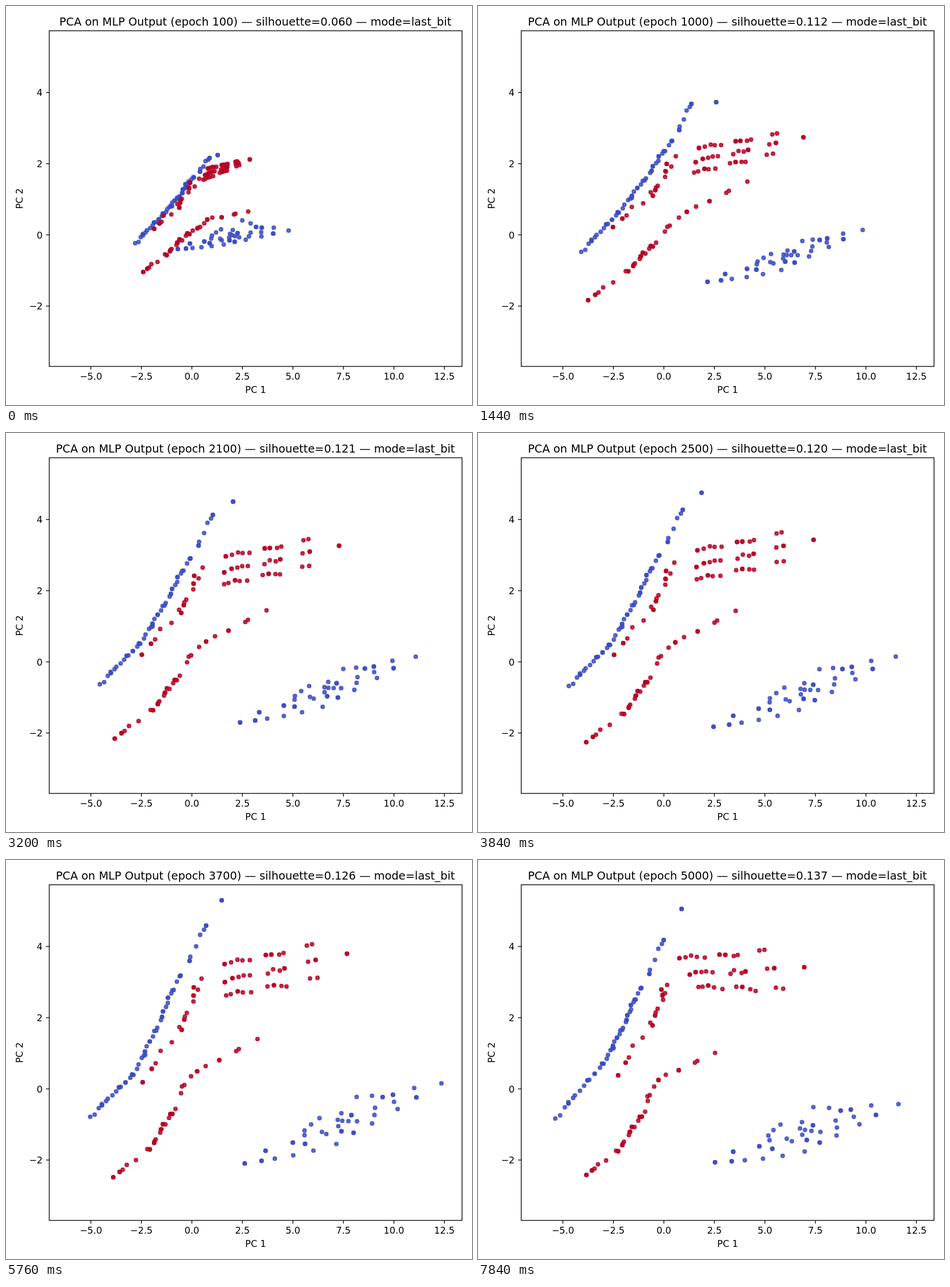
An HTML page with a canvas that plays this animation: 808 by 693 pixels, repeating every 8 s.

```html
<!DOCTYPE html>
<html lang="en">
<head>
<meta charset="utf-8">
<title>PCA scatter</title>
<style>
html, body { margin: 0; width: 100%; height: 100%; overflow: hidden; background: #fff; }
canvas { display: block; }
</style>
</head>
<body>
<canvas id="plot" width="808" height="693"></canvas>
<script>
const ctx = document.getElementById('plot').getContext('2d');
const BLUE = '#3b4cc0', RED = '#b40426';
const STEP_MS = 160, STEPS = 50;
const POSE_STEPS = [0, 9, 36, 49];
const POSE_EASE = [1.4, 1.3, 1]; // ease-out exponent of each stretch between poses
const SCORE_STEPS = [0, 9, 16, 24, 36, 49];
const SCORES = [0.060, 0.112, 0.122, 0.120, 0.126, 0.137];

const lerp = (a, b, p) => a + (b - a) * p;
const mix = (a, b, p) => [lerp(a[0], b[0], p), lerp(a[1], b[1], p)];
const noise = n => { const v = Math.sin(n * 12.9898) * 43758.5453; return v - Math.floor(v); };
const jitter = (n, size) => (noise(n) * 2 - 1) * size;

// Index of the stretch that holds value, and the progress through it.
function locate(stops, value) {
  const k = Math.max(1, stops.findIndex(s => s >= value)) - 1;
  return [k, (value - stops[k]) / (stops[k + 1] - stops[k])];
}

// Dots strung along a line; ranks tell how many dots lie between its guides.
function chain(color, ranks, spread, poses) {
  const last = ranks.at(-1);
  const place = guides => Array.from({ length: last + 1 }, (_, i) => {
    const loose = i > 1 && i < last ? 1 : 0;
    const [k, p] = locate(ranks, i + loose * jitter(i + 70, 0.8));
    const [x, y] = mix(guides[k], guides[k + 1], p);
    return [x + loose * jitter(2 * i + 1, spread), y + loose * jitter(2 * i + 2, spread)];
  });
  return { color, poses, place };
}

// Dots at (u, v) inside a four-cornered sheet that bends with its corners.
function sheet(color, spots, poses) {
  const place = ([a, b, c, d]) => spots.map(([u, v]) => mix(mix(a, b, u), mix(c, d, u), v));
  return { color, poses, place };
}

// Three clumps of three rows each, and one outlier on the right.
function clumpSpots() {
  const spots = [[1.37, 0.43]];
  [5, 4, 2].forEach((count, clump) => {
    for (let row = 0; row < 3; row++)
      for (let i = 0; i < count; i++) {
        const seed = spots.length * 2;
        spots.push([clump * 0.47 + i * 0.066 + jitter(seed, 0.015), row / 2 + jitter(seed + 1, 0.07)]);
      }
  });
  return spots;
}

// A 6 by 6 lattice, denser in the middle.
function latticeSpots() {
  const squeeze = i => { const x = i / 2.5 - 1; return 0.5 + x * (0.35 + 0.15 * x * x); };
  return Array.from({ length: 36 }, (_, n) => {
    const wobble = n % 35 ? 0.08 : 0;
    return [squeeze(n % 6) + jitter(n + 11, wobble), squeeze(Math.floor(n / 6)) + jitter(n + 53, wobble)];
  });
}

const clusters = [
  chain(BLUE, [0, 1, 8, 31, 45], 2.5, [
    [[367, 259], [353, 264], [323, 299], [277, 360], [224, 412]],
    [[413, 167], [370, 170], [333, 239], [248, 357], [179, 427]],
    [[374, 70], [347, 114], [298, 208], [225, 371], [146, 446]],
    [[353, 85], [322, 139], [279, 229], [222, 351], [134, 449]]
  ]),
  chain(RED, [0, 3, 9, 15], 6, [
    [[257, 387], [284, 359], [310, 328], [335, 300]],
    [[234, 384], [283, 340], [318, 305], [343, 261]],
    [[237, 386], [284, 316], [320, 255], [339, 206]],
    [[243, 374], [282, 308], [318, 248], [328, 217]]
  ]),
  sheet(RED, clumpSpots(), [
    [[351, 282], [401, 270], [342, 302], [404, 277]],
    [[385, 246], [518, 223], [374, 290], [510, 258]],
    [[381, 180], [531, 149], [381, 236], [539, 207]],
    [[351, 170], [498, 159], [382, 221], [529, 226]]
  ]),
  chain(RED, [0, 6, 18, 21, 24, 28], 2.5, [
    [[238, 462], [280, 428], [322, 390], [337, 383], [352, 370], [420, 357]],
    [[191, 511], [265, 454], [307, 411], [335, 376], [369, 355], [467, 305]],
    [[186, 551], [253, 496], [292, 432], [310, 383], [337, 365], [436, 311]],
    [[188, 547], [246, 500], [288, 437], [297, 403], [317, 379], [411, 335]]
  ]),
  sheet(BLUE, latticeSpots(), [
    [[298, 422], [405, 376], [372, 416], [490, 390]],
    [[398, 479], [555, 412], [520, 463], [667, 389]],
    [[414, 527], [600, 418], [565, 500], [755, 388]],
    [[411, 525], [575, 435], [560, 512], [729, 424]]
  ])
];

function text(str, x, y, size, align = 'center') {
  ctx.font = `${size}px "DejaVu Sans", sans-serif`;
  ctx.textAlign = align;
  ctx.fillText(str, x, y);
}

function line(x1, y1, x2, y2) {
  ctx.beginPath();
  ctx.moveTo(x1, y1);
  ctx.lineTo(x2, y2);
  ctx.stroke();
}

function dot([x, y]) {
  ctx.beginPath();
  ctx.arc(x, y, 2.9, 0, 2 * Math.PI);
  ctx.fill();
  ctx.stroke();
}

function drawAxes() {
  const label = (v, digits) => v.toFixed(digits).replace('-', '\u2212');
  ctx.fillStyle = ctx.strokeStyle = '#000';
  ctx.lineWidth = 1.3;
  ctx.strokeRect(75, 43, 715.7, 583);
  for (let v = -5; v <= 12.5; v += 2.5) {
    const x = 322.3 + 35.03 * v;
    line(x, 626, x, 631.6);
    text(label(v, 1), x, 649.4, 16.03);
  }
  for (let v = -2; v <= 4; v += 2) {
    const y = 397.5 - 61.8 * v;
    line(69.4, y, 75, y);
    text(label(v, 0), 63.5, y + 6, 16.03, 'right');
  }
  text('PC 1', 432.8, 671.5, 16.03);
  ctx.save();
  ctx.translate(28.5, 334.5);
  ctx.rotate(-Math.PI / 2);
  text('PC 2', 0, 0, 16.03);
  ctx.restore();
}

function drawDots(step) {
  const [pose, progress] = locate(POSE_STEPS, step);
  const p = 1 - (1 - progress) ** POSE_EASE[pose];
  ctx.globalAlpha = 0.8;
  ctx.lineWidth = 2.3;
  for (const { color, poses, place } of clusters) {
    ctx.fillStyle = ctx.strokeStyle = color;
    const guides = poses[pose].map((from, i) => mix(from, poses[pose + 1][i], p));
    place(guides).forEach((spot, i) => {
      dot(spot);
      if (noise(i + 300) < 0.4) dot(spot); // coinciding samples look darker
    });
  }
  ctx.globalAlpha = 1;
}

function draw(step) {
  ctx.fillStyle = '#fff';
  ctx.fillRect(0, 0, 808, 693);
  drawDots(step);
  drawAxes();
  const [k, p] = locate(SCORE_STEPS, step);
  const score = lerp(SCORES[k], SCORES[k + 1], p).toFixed(3);
  text(`PCA on MLP Output (epoch ${100 * (step + 1)}) — silhouette=${score} — mode=last_bit`, 432.4, 34, 19.27);
}

const start = performance.now();
function tick() {
  draw(Math.floor((performance.now() - start) / STEP_MS) % STEPS);
  requestAnimationFrame(tick);
}
tick();
</script>
</body>
</html>
```
